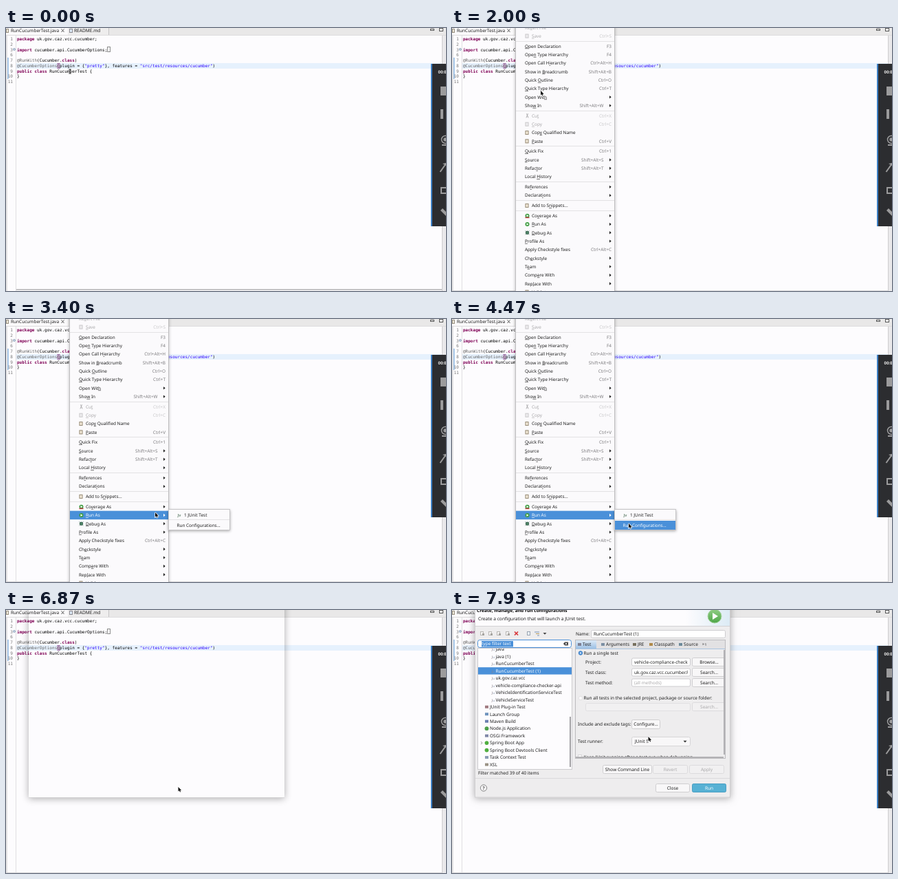
An HTML page with a canvas for the animation above (8000 ms loop, 640 by 382 pixels).

```html
<!DOCTYPE html>
<html lang="en">
<head>
<meta charset="utf-8">
<title>Run configuration</title>
<style>
html, body { margin: 0; width: 100%; height: 100%; overflow: hidden; background: #fdfcfe; }
canvas { display: block; width: 640px; height: 382px; }
</style>
</head>
<body>
<canvas id="stage"></canvas>
<script>
const W = 640, H = 382, LOOP = 8000;
const canvas = document.getElementById('stage');
const dpr = window.devicePixelRatio || 1;
canvas.width = W * dpr;
canvas.height = H * dpr;
const c = canvas.getContext('2d');

const UI = '"Noto Sans", "Open Sans", sans-serif';
const MONO = '"DejaVu Sans Mono", monospace';
const BLUE = '#4a90d9', INK = '#1e1e1e', DIM = '#a9a8aa';

// Scene changes in ms
const T = {
  tooltip: 530, caret: 600, menu: 1400, submenu: 2930, click: 4600,
  arrow: 6400, windowOpen: 6600, dialog: 7000, details: 7330
};

const path = [
  [0, 93, 63], [1500, 93, 63], [1950, 129, 91], [2050, 129, 91], [2780, 150, 283],
  [3350, 217, 281], [3700, 217, 281], [4300, 257, 297], [6270, 258, 297],
  [6800, 250.5, 257], [7130, 250.5, 257], [7850, 285.5, 184], [8000, 285.5, 184]
];

function pointer(t) {
  const i = Math.max(1, path.findIndex(p => p[0] > t));
  const [a, b] = [path[i - 1], path[i]];
  const k = (t - a[0]) / (b[0] - a[0]);
  const e = k * k * (3 - 2 * k);
  return [a[1] + (b[1] - a[1]) * e, a[2] + (b[2] - a[2]) * e];
}

function rect(x, y, w, h, fill, stroke) {
  if (fill) { c.fillStyle = fill; c.fillRect(x, y, w, h); }
  if (stroke) { c.strokeStyle = stroke; c.lineWidth = 1; c.strokeRect(x + .5, y + .5, w - 1, h - 1); }
}

function round(x, y, w, h, fill, stroke, r = 2) {
  c.beginPath();
  c.roundRect(x + .5, y + .5, w - 1, h - 1, r);
  c.fillStyle = fill; c.fill();
  c.strokeStyle = stroke; c.lineWidth = 1; c.stroke();
}

function disc(x, y, r, fill, stroke, width = 1) {
  c.beginPath();
  c.arc(x, y, r, 0, 7);
  if (fill) { c.fillStyle = fill; c.fill(); }
  if (stroke) { c.strokeStyle = stroke; c.lineWidth = width; c.stroke(); }
}

function poly(points, fill, stroke, width = 1) {
  c.beginPath();
  points.forEach(([x, y]) => c.lineTo(x, y));
  if (fill) { c.closePath(); c.fillStyle = fill; c.fill(); }
  if (stroke) { c.strokeStyle = stroke; c.lineWidth = width; c.stroke(); }
}

function gradient(x0, y0, x1, y1, ...colors) {
  const g = c.createLinearGradient(x0, y0, x1, y1);
  colors.forEach((color, i) => g.addColorStop(i / (colors.length - 1), color));
  return g;
}

function shadowed(blur, color, draw) {
  c.save();
  c.shadowColor = color;
  c.shadowBlur = blur * dpr;
  c.shadowOffsetY = dpr;
  draw();
  c.restore();
}

function clipped(x, y, w, h, draw) {
  c.save();
  c.beginPath();
  c.rect(x, y, w, h);
  c.clip();
  draw();
  c.restore();
}

// y is the middle of the line; returns the advance width
function text(s, x, y, color = INK, { size = 6.5, bold = false, align = 'left', font = UI } = {}) {
  c.font = `${bold ? 'bold ' : ''}${size}px ${font}`;
  c.textAlign = align;
  c.fillStyle = color;
  c.fillText(s, x, y + 2.3);
  return c.measureText(s).width;
}

function runs(parts, x, y, opt) {
  for (const [s, color, style] of parts) {
    const w = text(s, x, y, color, { ...opt, bold: style === 'bold' });
    if (style === 'link') rect(x, y + 3, w, .6, color);
    x += w;
  }
}

const KEY = '#7f0055', NOTE = '#646464', STR = '#2a00ff', BLK = '#000';
const code = [
  [1, [['package', KEY, 'bold'], [' uk.gov.caz.vcc.cucumber;', BLK]]],
  [2, []],
  [3, [['import', KEY, 'bold'], [' cucumber.api.CucumberOptions;', BLK]]],
  [6, []],
  [7, [['@RunWith', NOTE], ['(Cucumber.', BLK], ['class', KEY, 'bold'], [')', BLK]]],
  [8, [['@CucumberOptions', NOTE], ['(plugin = {', BLK], ['"pretty"', STR], ['}, features = ', BLK],
    ['"src/test/resources/cucumber"', STR], [')', BLK]]],
  [9, [['public class', KEY, 'bold'], [' RunCucumberTest {', BLK]]],
  [10, [['}', BLK]]],
  [11, []]
];

function editor(t) {
  rect(0, 0, W, H, '#fdfcfe');
  rect(0, 0, W, 11, '#e9e8e8');
  rect(0, 0, 90, 11, '#fbfafb');
  rect(90, 0, 59, 11, '#eeeded');
  rect(149, 0, 1, 11, '#c6c5c6');
  rect(0, 10, W, 1, '#dddcdd');
  rect(0, 11, 2, H, '#e3e2e3');
  rect(14, 11, 1, H, '#e0dfe2');
  rect(634, 11, 6, H, '#eae9eb');
  rect(634, 11, 1, H, '#cfced0');
  rect(2, 43, 2, 31, '#a9c9ea');
  rect(15, 51, 619, 8, '#e6f1fd');
  if (t < T.menu) rect(15, 379, 619, 2, '#c4c3c5');
  else rect(0, 381, 634, 1, '#d8d7d9');

  rect(0, 1, 4, 6, '#efe9dc', '#98907f');
  text('RunCucumberTest.java', 7, 4, INK, { size: 6.5 });
  poly([[80.5, 1.5], [84.5, 6]], null, '#555');
  poly([[84.5, 1.5], [80.5, 6]], null, '#555');
  rect(92, 1, 5, 6, '#dbe8f5', '#8b8a91');
  text('README.md', 99, 4, INK, { size: 6.6 });
  rect(617, 1, 6, 3, '#fff', '#555');
  rect(630, 0, 6, 5, '#fff', '#555');

  rect(74.5, 51, 4, 8, '#ecd3ee', '#9a70a6');
  const opt = { size: 6.076, font: MONO };
  code.forEach(([n, parts], i) => {
    const y = 15.7 + 7.75 * i;
    text(n, 10, y, '#787878', { ...opt, align: 'right' });
    runs(parts, 15.9, y, opt);
  });
  disc(12, 31, 1.5, '#cfdcec', '#7890ad', .7);
  rect(147, 27, 5, 8, null, '#8b8b8b');
  if (t >= T.caret && t < T.menu) rect(305, 51, 1, 8, '#000');
}

function recorder() {
  const grey = '#9b9b9c';
  rect(618, 52, 22, 236, '#2c2d30');
  rect(618, 52, 2, 236, '#3c7fc4');
  text('00:00', 628.5, 63.5, '#eee', { size: 6, bold: true });
  rect(632, 85, 8, 13, grey);
  rect(632, 118, 4, 14, grey);
  disc(639, 162, 5.5, null, grey, 1.5);
  disc(639, 162, 2.7, grey);
  rect(634, 169, 6, 2, grey);
  poly([[631.5, 209], [640, 197]], null, grey, 2);
  poly([[635, 197], [640, 196], [640, 200]], grey);
  rect(632, 231, 12, 10, null, grey);
  rect(633, 232, 10, 8, null, grey);
  poly([[632, 265], [635, 262], [640, 267], [640, 273]], grey);
}

function tooltip() {
  const link = '#3576b8', opt = { size: 6.75 };
  shadowed(5, 'rgba(0,0,0,.5)', () => rect(63, 68, 260, 55, '#fdfcfe'));
  rect(62, 68, 262, 55, null, '#aaa9ab');
  rect(63, 115, 260, 1, '#e2e1e3');
  disc(68.5, 73, 3, '#3d9a5b');
  text('C', 68.5, 73, '#fff', { size: 5, bold: true, align: 'center' });
  text('uk.gov.caz.vcc.cucumber.RunCucumberTest', 74.5, 74, BLK, { size: 6.55, bold: true });
  runs([['@', INK], ['RunWith', link, 'link'], ['(', INK], ['value', link, 'link'], ['=', INK],
    ['Cucumber', link, 'link'], ['.class)', INK]], 65, 90, opt);
  runs([['@', INK], ['CucumberOptions', link, 'link'], ['(', INK], ['plugin', link, 'link'],
    ['={"pretty"}, ', INK], ['features', link, 'link'], ['={"src/test/resources/cucumber"})', INK]], 65, 97.5, opt);
  text("Press 'F2' for focus", 322, 119, '#aaa9ab', { size: 6, align: 'right' });
}

// Label with & before the mnemonic | shortcut | flags: a arrow, d disabled, i icon, s separator below
const menu = [
  'Re&vert File||d', '&Save|Ctrl+S|dis', '&Open Declaration|F3|', 'Ope&n Type Hierarchy|F4|',
  'Open Call H&ierarchy|Ctrl+Alt+H|', 'Show in &Breadcrumb|Shift+Alt+B|', 'Quick &Outline|Ctrl+O|',
  '&Quick Type Hierarchy|Ctrl+T|', 'Open Wit&h||a', 'Sho&w In|Shift+Alt+W|as', 'Cu&t|Ctrl+X|di',
  '&Copy|Ctrl+C|di', 'Cop&y Qualified Name||i', '&Paste|Ctrl+V|is', '&Quick Fix|Ctrl+1|',
  '&Source|Shift+Alt+S|a', 'Refac&tor|Shift+Alt+T|a', 'Local &History||as', 'Re&ferences||a',
  'Declarat&ions||as', 'Add to S&nippets...||is', 'Co&verage As||ai', '&Run As||ai', '&Debug As||ai',
  '&Profile As||a', 'Apply Checkstyle fixes|Ctrl+Alt+C|', 'Ch&eckstyle||a', 'T&eam||a',
  'Comp&are With||a', 'Rep&lace With||a', '&Validate||i'
].map(s => {
  const [raw, keys, flags] = s.split('|');
  return { at: raw.indexOf('&'), label: raw.replace('&', ''), keys, flags, has: f => flags.includes(f) };
});
menu.reduce((y, m) => { m.y = y; return y + 12.33 + (m.has('s') ? 2.4 : 0); }, -.7);

function menuIcon(label, x, y) {
  if (label === 'Run As' || label === 'Coverage As') {
    disc(x, y, 3, '#3c9c3f');
    poly([[x - 1, y - 1.8], [x + 2, y], [x - 1, y + 1.8]], '#fff');
    if (label[0] === 'C') rect(x - 3, y + 2, 6, 1.5, '#b53c3c');
  } else if (label === 'Debug As') {
    disc(x, y, 2.2, '#5f9a78', '#35604c');
    poly([[x - 3, y - 3], [x + 3, y + 3]], null, '#35604c', .6);
    poly([[x + 3, y - 3], [x - 3, y + 3]], null, '#35604c', .6);
  } else if (label === 'Cut') {
    poly([[x - 1, y - 3], [x + 1.5, y + 3]], null, DIM);
    poly([[x + 1, y - 3], [x - 1.5, y + 3]], null, DIM);
  } else {
    const pale = label === 'Save' || label === 'Copy';
    rect(x - 3, y - 3, 5, 6, pale ? '#eeedef' : '#f3ead8', pale ? '#cbcacc' : '#958a78');
  }
}

function contextMenu(t, mx, my) {
  shadowed(5, 'rgba(0,0,0,.4)', () => rect(93, -5, 143, 400, '#fbfafc'));
  rect(92, -2, 145, 390, null, '#c0bfc1');
  const hot = t < 2080 ? null
    : mx > 236 ? menu.find(m => m.label === 'Run As')
    : menu.find(m => Math.abs(m.y - my) < 6.2 && !m.has('d'));
  for (const m of menu) {
    const on = m === hot, x = m.has('i') ? 116 : 106;
    if (on) rect(93, m.y - 6.3, 143, 12.5, BLUE);
    const ink = on ? '#fff' : m.has('d') ? DIM : INK;
    text(m.label, x, m.y, ink, { size: 6.42 });
    if (m.at >= 0) {
      const before = c.measureText(m.label.slice(0, m.at)).width;
      rect(x + before, m.y + 3.2, c.measureText(m.label[m.at]).width, .6, ink);
    }
    if (m.has('i')) menuIcon(m.label, 109.5, m.y);
    text(m.keys, m.has('a') ? 220.5 : 232, m.y, on ? '#fff' : m.has('d') ? '#c9c8ca' : '#7c7b7e',
      { size: 6.42, align: 'right' });
    if (m.has('a')) poly([[229, m.y - 2.2], [231.7, m.y], [229, m.y + 2.2]], ink);
    if (m.has('s')) rect(93, Math.round(m.y + 7), 143, 1, '#e3e2e4');
  }
  if (t >= T.submenu) submenu(mx, my);
}

function submenu(mx, my) {
  shadowed(4, 'rgba(0,0,0,.35)', () => rect(236, 277, 90, 30, '#fbfafc'));
  rect(236, 276, 90, 31, null, '#c6c5c7');
  rect(237, 291, 88, 1, '#e3e2e4');
  const row = mx < 237 ? -1 : my < 291.5 ? 0 : 1;
  if (row >= 0) rect(237, row ? 293 : 278, 88, 13, BLUE);
  text('Jv', 249.5, 284.5, row === 0 ? '#fff' : '#6f8a78', { size: 5.5, bold: true });
  text('1 JUnit Test', 259, 284.5, row === 0 ? '#fff' : INK, { size: 6.42 });
  text('Run Configurations...', 248.5, 299.3, row === 1 ? '#fff' : INK, { size: 6.42 });
}

const tree = [
  'java', 'java (1)', 'RunCucumberTest', 'RunCucumberTest (1)', 'uk.gov.caz.vcc',
  'vehicle-compliance-checker-api', 'VehicleIdentificationServiceTest', 'VehicleServiceTest',
  'JUnit Plug-in Test', 'Launch Group', 'Maven Build', 'Node.js Application', 'OSGi Framework',
  'Spring Boot App', 'Spring Boot Devtools Client', 'Task Context Test', 'XSL'
];
const treeTints = ['#a07a80', '#6f93bd', '#6b7fb0', '#4ea04b', '#8087a8', '#4fae3f', '#4fae3f', '#8a9bb5', '#9a9285'];

function button(label, x, y, w, h = 13, ink = INK, fill = '#f8f7f8', edge = '#cfced0') {
  round(x, y, w, h, fill, edge);
  text(label, x + w / 2, y + h / 2, ink, { align: 'center' });
}

function field(value, x, y, w, ink = INK) {
  round(x, y, w, 12, '#fff', '#cdcccf');
  clipped(x, y, w - 4, 12, () => text(value, x + 4, y + 6, ink));
}

function radio(x, y, on) {
  disc(x, y, 2.8, on ? BLUE : '#fbfafb', on ? '#3a7bbf' : '#dddcde', .8);
  if (on) disc(x, y, 1.1, '#fff');
}

function windowShadow() {
  c.save();
  c.beginPath();
  c.rect(0, 0, W, H);
  c.rect(33, -20, 372, 292.5);
  c.clip('evenodd');
  shadowed(10, 'rgba(0,0,0,.32)', () => rect(33, -20, 372, 292.5, '#999'));
  c.restore();
}

function toolbar() {
  [41, 53, 65, 78].forEach(x => {
    rect(x, 31, 5, 6, '#f4f3f2', '#b9b7b4');
    rect(x + 3, 34, 3, 3, '#a5a39f');
  });
  poly([[91, 31.5], [96, 36.5]], null, '#d8383d', 1.7);
  poly([[96, 31.5], [91, 36.5]], null, '#d8383d', 1.7);
  rect(109, 31, 5, 6, '#eaf1f8', '#9aa3b0');
  poly([[120, 32], [127, 32]], null, '#7790b4');
  poly([[122, 34.5], [127, 34.5]], null, '#b79a5b');
  poly([[124, 37], [127, 37]], null, '#7790b4');
  poly([[132.5, 33], [137.5, 33], [135, 35.8]], '#444');
}

function treeIcon(i, x, y) {
  if (i < 8) {
    text('J', x - 6, y, '#8d7f86', { size: 5.2 });
    text('u', x - 4.3, y, '#7f90a6', { size: 4.6 });
  } else if (/^(Node|Spring)/.test(tree[i])) disc(x - 4.5, y, 2.9, treeTints[i - 8]);
  else rect(x - 7, y - 2, 5, 4, treeTints[i - 8]);
}

function dialogLeft() {
  rect(33, -2, 372, 274.5, '#eeedee', '#cfced0');
  rect(34, 0, 370, 23, gradient(340, 0, 404, 0, '#fdfcfe', '#dcebf5'));
  rect(34, 23, 370, 1, '#d3d2d4');
  text('Create, manage, and run configurations', 36, .3, BLK, { size: 6.6, bold: true });
  text('Create a configuration that will launch a JUnit test.', 38, 13, INK, { size: 6.67 });
  disc(382, 9, 10, gradient(0, 0, 0, 19, '#8ccb80', '#4ea648'), '#a9d5a3');
  poly([[379, 4], [387, 9], [379, 14]], '#fff');
  toolbar();

  rect(37, 55, 138, 177, '#fdfcfe', '#cdcccf');
  clipped(38, 56, 136, 175, () => {
    tree.forEach((label, i) => {
      const y = 57 + 10.47 * i, x = i < 8 ? 63.5 : 55, on = i === 3;
      if (on) rect(38, y - 5.2, 136, 10.4, BLUE);
      treeIcon(i, x, y);
      text(label, x, y, on ? '#fff' : INK);
      if (label === 'Spring Boot App') poly([[42, y - 2], [44, y], [42, y + 2]], null, '#777', .8);
    });
    rect(171, 155, 2, 73, '#a3a2a5');
  });
  round(37, 43, 137, 12, '#fff', BLUE, 3);
  rect(43, 45, 46, 8.5, BLUE);
  text('type filter text', 43, 49, '#fff');
  poly([[162, 49], [164, 46.5], [169, 46.5], [169, 51.5], [164, 51.5]], '#444');
  poly([[164.6, 47.6], [167.4, 50.4]], null, '#fff', .8);
  poly([[167.4, 47.6], [164.6, 50.4]], null, '#fff', .8);
  text('Filter matched 39 of 40 items', 38, 236.5);
  disc(46, 258.5, 4.6, '#f8f7f8', '#777', .9);
  text('?', 46, 258.5, '#444', { bold: true, align: 'center' });
  rect(34, 244, 370, 1, '#dad9db');
  button('Close', 296, 252, 50);
  button('Run', 349, 252, 50, 13, DIM);
}

function dialogRight() {
  text('Name:', 180, 35);
  field('RunCucumberTest (1)', 202, 29, 196);
  rect(179, 43, 219, 173, '#eeedee', '#bcbbbe');
  rect(180, 44, 217, 12, '#e2e1e3');
  rect(180, 44, 30, 12, gradient(0, 44, 0, 56, '#dbe9f6', '#9cc0e4'));
  rect(180, 56, 217, 1, '#a9c3df');
  [['Test', 190, '#7d7f92'], ['Arguments', 224, '#7c8fa3'], ['JRE', 270, '#77705f'],
    ['Classpath', 294, '#b08a4a'], ['Source', 337, '#6d8a9a']].forEach(([label, x, tint]) => {
    rect(x - 7, 48, 5, 4, tint);
    text(label, x, 50);
  });
  text('»', 364, 48.5, INK, { size: 5.5 });
  text('1', 367.5, 50, INK, { size: 5 });

  clipped(180, 57, 217, 158, () => {
    radio(187, 62.5, true);
    text('Run a single test', 191.5, 62.5);
    const search = [['Project:', 'vehicle-compliance-check', 'Browse...', INK],
      ['Test class:', 'uk.gov.caz.vcc.cucumber.RunCucumberTest', 'Search...', INK],
      ['Test method:', '(all methods)', 'Search...', DIM]];
    search.forEach(([label, value, action, ink], i) => {
      const y = 75.5 + 15 * i;
      text(label, 194, y);
      field(value, 261, y - 6, 86, ink);
      button(action, 349, y - 6.5, 50);
    });
    radio(187, 128, false);
    text('Run all tests in the selected project, package or source folder:', 191.5, 128);
    round(194, 135, 153, 12, '#f1f0f1', '#e0dfe1');
    button('Search...', 349, 134, 50, 13, DIM, '#f1f0f1', '#dcdbdd');
    text('Include and exclude tags:', 183, 166);
    button('Configure...', 261, 159, 42, 14);
    text('Test runner:', 183, 191);
    round(261, 184, 86, 14, '#f8f7f8', '#d6d5d7');
    text('JUnit 5', 266, 191);
    poly([[336.5, 189.7], [341.5, 189.7], [339, 192.5]], '#333');
    rect(183, 210, 6, 6, '#fbfafb', '#d6d5d7');
    text('Keep JUnit running after a test run when debugging', 191.5, 213.5);
    rect(180, 213, 215, 2, '#b3b2b5');
    rect(395, 58, 2, 152, '#b3b2b5');
  });
  button('Show Command Line', 219, 225, 72);
  button('Revert', 292, 225, 51, 13, DIM, '#f1f0f1', '#dcdbdd');
  button('Apply', 345, 225, 51, 13, DIM, '#f1f0f1', '#dcdbdd');
  button('Run', 349, 252, 50, 13, '#fff', '#57b1d4', '#4a9fc4');
}

const arrowShape = [[0, 0], [0, 6.6], [1.5, 5.3], [2.6, 7.6], [3.7, 7], [2.7, 4.9], [4.6, 4.7]];

function cursor(t, x, y) {
  const arrow = (t >= T.menu && t < T.click) || t >= T.arrow;
  if (arrow) {
    const shape = arrowShape.map(([dx, dy]) => [x + dx, y + dy]);
    poly([...shape, shape[0]], null, '#fff', 1.4);
    poly(shape, '#111');
  } else {
    rect(x - .4, y - 3, 1, 6, '#222');
    rect(x - 1.7, y - 3.4, 3.6, .9, '#222');
    rect(x - 1.7, y + 2.6, 3.6, .9, '#222');
  }
}

function draw(t) {
  c.setTransform(dpr, 0, 0, dpr, 0, 0);
  c.textBaseline = 'alphabetic';
  c.textRendering = 'geometricPrecision';
  const [x, y] = pointer(t);
  editor(t);
  if (t >= T.tooltip && t < T.menu) tooltip();
  if (t >= T.menu && t < T.click) contextMenu(t, x, y);
  if (t >= T.windowOpen) windowShadow();
  if (t >= T.dialog) dialogLeft();
  if (t >= T.details) dialogRight();
  recorder();
  cursor(t, x, y);
}

const start = performance.now();
function tick() {
  draw((performance.now() - start) % LOOP);
  requestAnimationFrame(tick);
}
tick();
</script>
</body>
</html>
```
